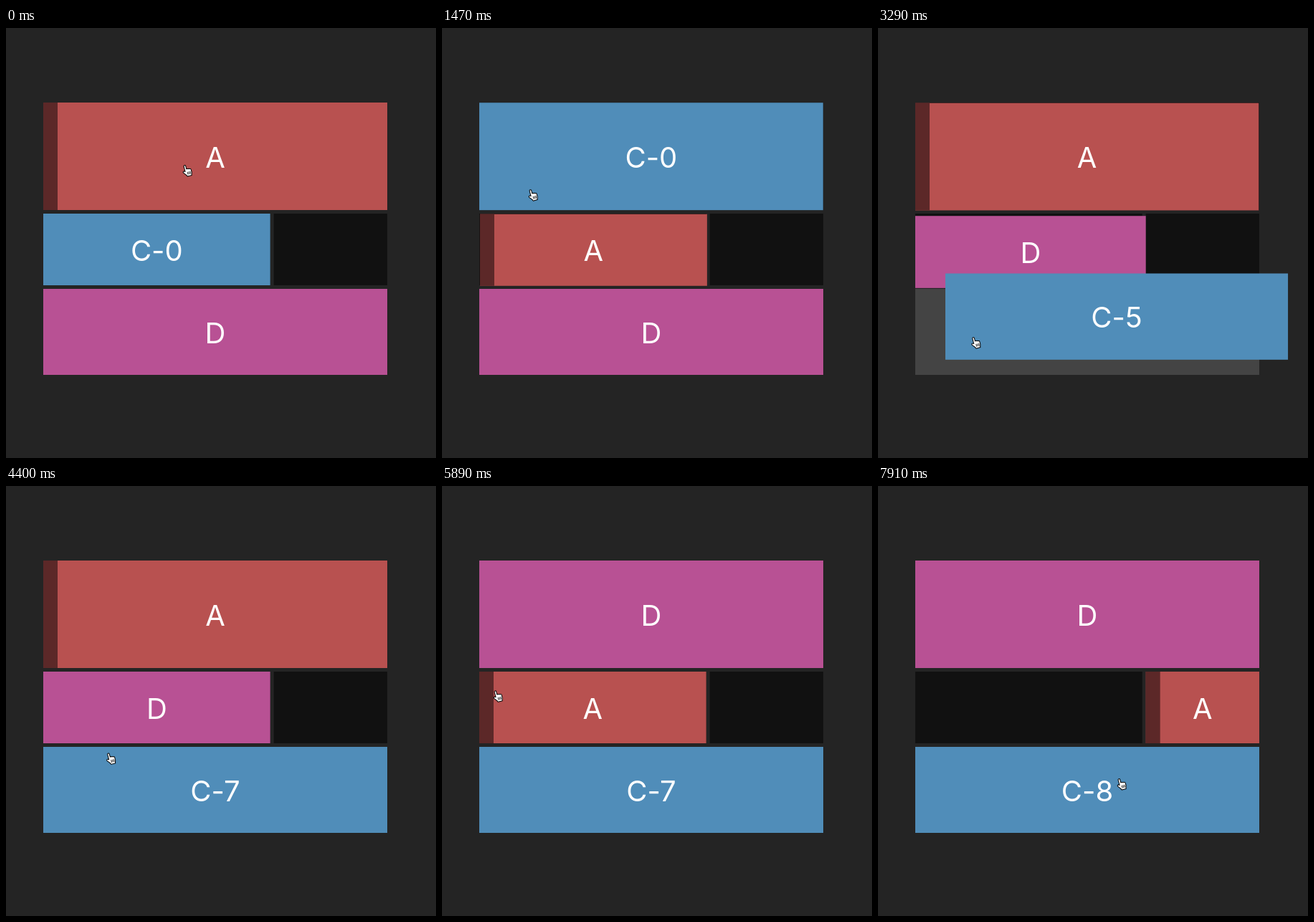
An HTML page for the animation above (8 s loop, 600 px wide and 600 px high).

```html
<!DOCTYPE html>
<html lang="en">
<head>
<meta charset="utf-8">
<title>Swap layout</title>
<style>
  html, body { margin: 0; width: 100%; height: 100%; overflow: hidden; background: #242424; }
  svg { display: block; width: 100%; height: 100%; }
  text {
    font: 400 40px Inter, "Open Sans", sans-serif;
    font-variant-ligatures: no-contextual;
    fill: #fff;
    text-anchor: middle;
  }
</style>
</head>
<body>
<svg viewBox="0 0 600 600">
  <g id="slots"></g>
  <g id="items"></g>
  <g id="cursor">
    <g transform="rotate(-15)" stroke="#000" stroke-linejoin="round" stroke-linecap="round">
      <path fill="#fff" d="M-3.2 .6V-6.8a1.3 1.3 0 0 1 2.6 0V-2.4q1.2-.9 2.2 .4q1.2-.7 2 .5q1.8-.5 1.8 1.3V3C5.4 5 4.4 5.6 4.3 7.8H-1.9C-2.2 5.6-4.4 4-6 1.7C-6.8 .3-5.2-.9-4.2-.1Z"/>
      <path fill="none" stroke-width=".8" d="M-.4 2.2v3M1.5 2.2v3M3.4 2.2v3"/>
    </g>
  </g>
</svg>
<script>
const LOOP = 8000, SETTLE = 300, LAG = 45;
const NS = 'http://www.w3.org/2000/svg';

// The middle row is split 2:1; every slot is x, y, width, height
const X = 52, W = 480, GAP = 5, third = (W - GAP) / 3;
const slots = {
  top: [X, 104, W, 150],
  left: [X, 259, third * 2, 100],
  right: [X + third * 2 + GAP, 259, third, 100],
  bottom: [X, 364, W, 120]
};
const items = {
  A: { home: 'top', fill: '#b85150' },
  C: { home: 'left', fill: '#508db9' },
  D: { home: 'bottom', fill: '#b85194' }
};

// Pointer strokes: start, end, x, y
const origin = [253, 199];
const strokes = [
  [30, 850, 69, 195],
  // A down to the middle row, then over to C
  [890, 1140, 73, 199], [1140, 1280, 77, 358],
  [1320, 1480, 127.5, 232], [1500, 2500, 94, 198],
  // C down to the bottom
  [2720, 2980, 100, 204], [2990, 3134, 136, 436.5], [3260, 3360, 139, 448],
  [3400, 3850, 162, 425], [4260, 4510, 136, 350],
  // D up to the top, then over to the handle of A
  [4740, 4940, 150, 340], [4940, 5270, 256, 211],
  [5460, 6000, 57, 303], [6540, 6620, 57, 310],
  // A to the right, then over to C
  [6680, 6731, 57, 320], [6731, 7101, 425, 320], [7120, 7460, 402, 320],
  [7540, 7880, 340, 416]
];
// item, grab time, release time
const drags = [['A', 870, 1320], ['C', 2700, 3385], ['D', 4720, 5435], ['A', 6660, 7510]];
// first click, number of clicks, interval
const bursts = [[1690, 5, 180], [3950, 2, 310], [7840, 1, 0]];

const clamp = v => Math.min(1, Math.max(0, v));
const easeOut = v => 1 - (1 - clamp(v)) ** 3;
const smooth = v => clamp(v) ** 2 * (3 - 2 * clamp(v));
const mix = (a, b, p) => a.map((v, i) => v + (b[i] - v) * p);

const pointer = t => strokes.reduce(
  (pos, [start, end, x, y]) => mix(pos, [x, y], smooth((t - start) / (end - start))), origin);

function slotUnder([x, y]) {
  const tipX = x - 4, tipY = y - 8;
  return Object.keys(slots).find(name => {
    const [sx, sy, w, h] = slots[name];
    return tipX > sx && tipX < sx + w && tipY > sy && tipY < sy + h;
  });
}

// A dragged item trades places with whatever fills the slot under the pointer
const moves = [];
const movesOf = (id, t) => moves.filter(m => m.id === id && m.time <= t);

function slotOf(id, t) {
  const last = movesOf(id, t).pop();
  return last ? last.slot : items[id].home;
}

for (const [id, grab, release] of drags) {
  for (let time = grab; time < release; time++) {
    const from = slotOf(id, time), slot = slotUnder(pointer(time));
    if (!slot || slot === from) continue;
    const other = Object.keys(items).find(k => slotOf(k, time) === slot);
    moves.push({ time, id, slot });
    if (other) moves.push({ time, id: other, slot: from });
  }
}

function layout(id, t) {
  const list = movesOf(id, t);
  return list.reduce((rect, { time, slot }, i) => {
    const end = i + 1 < list.length ? list[i + 1].time : t;
    return mix(rect, slots[slot], easeOut((end - time) / SETTLE));
  }, slots[items[id].home]);
}

function place(id, t) {
  const rect = layout(id, t);
  const drag = drags.filter(d => d[0] === id && d[1] <= t).pop();
  if (!drag) return rect;
  const [, grab, release] = drag;
  const from = pointer(grab);
  const to = pointer(Math.max(grab, Math.min(t, release) - LAG));
  const held = layout(id, grab).slice(0, 2).map((v, i) => v + to[i] - from[i]);
  const pos = mix(held, rect, easeOut((t - release) / SETTLE));
  return [...pos, rect[2], rect[3]];
}

function add(parent, tag, attrs = {}) {
  const el = parent.appendChild(document.createElementNS(NS, tag));
  for (const k in attrs) el.setAttribute(k, attrs[k]);
  return el;
}

function setBox(el, [x, y, width, height]) {
  const box = { x, y, width, height };
  for (const k in box) el.setAttribute(k, box[k]);
}

const layer = document.getElementById('items');
const cursor = document.getElementById('cursor');
const slotEls = {};
for (const name in slots) {
  slotEls[name] = add(document.getElementById('slots'), 'rect');
  setBox(slotEls[name], slots[name]);
}
for (const id in items) {
  const item = items[id];
  item.g = add(layer, 'g');
  item.box = add(item.g, 'rect', { fill: item.fill });
  if (id === 'A') item.handle = add(item.g, 'rect', { fill: '#5c2828' });
  item.label = add(item.g, 'text');
  item.label.textContent = id;
}

const clicksBy = t => bursts.reduce((sum, [first, count, gap]) =>
  sum + (t < first ? 0 : Math.min(count, 1 + Math.floor((t - first) / (gap || LOOP)))), 0);

function draw(t) {
  const drag = drags.filter(d => d[1] <= t).pop();
  const lit = drag && t < drag[2] ? slotOf(drag[0], t) : '';
  for (const name in slots) slotEls[name].setAttribute('fill', name === lit ? '#444' : '#111');

  const front = items[drag ? drag[0] : 'D'].g;
  if (layer.lastChild !== front) layer.appendChild(front);

  for (const id in items) {
    const { box, handle, label } = items[id];
    const [x, y, w, h] = place(id, t);
    setBox(box, [x, y, w, h]);
    if (handle) setBox(handle, [x, y, 20, h]);
    label.setAttribute('x', x + w / 2);
    label.setAttribute('y', y + h / 2 + 15.5);
  }
  items.C.label.textContent = 'C-' + clicksBy(t);
  cursor.setAttribute('transform', `translate(${pointer(t)})`);
}

const begin = performance.now();
function frame() {
  draw((performance.now() - begin) % LOOP);
  requestAnimationFrame(frame);
}
frame();
</script>
</body>
</html>
```
